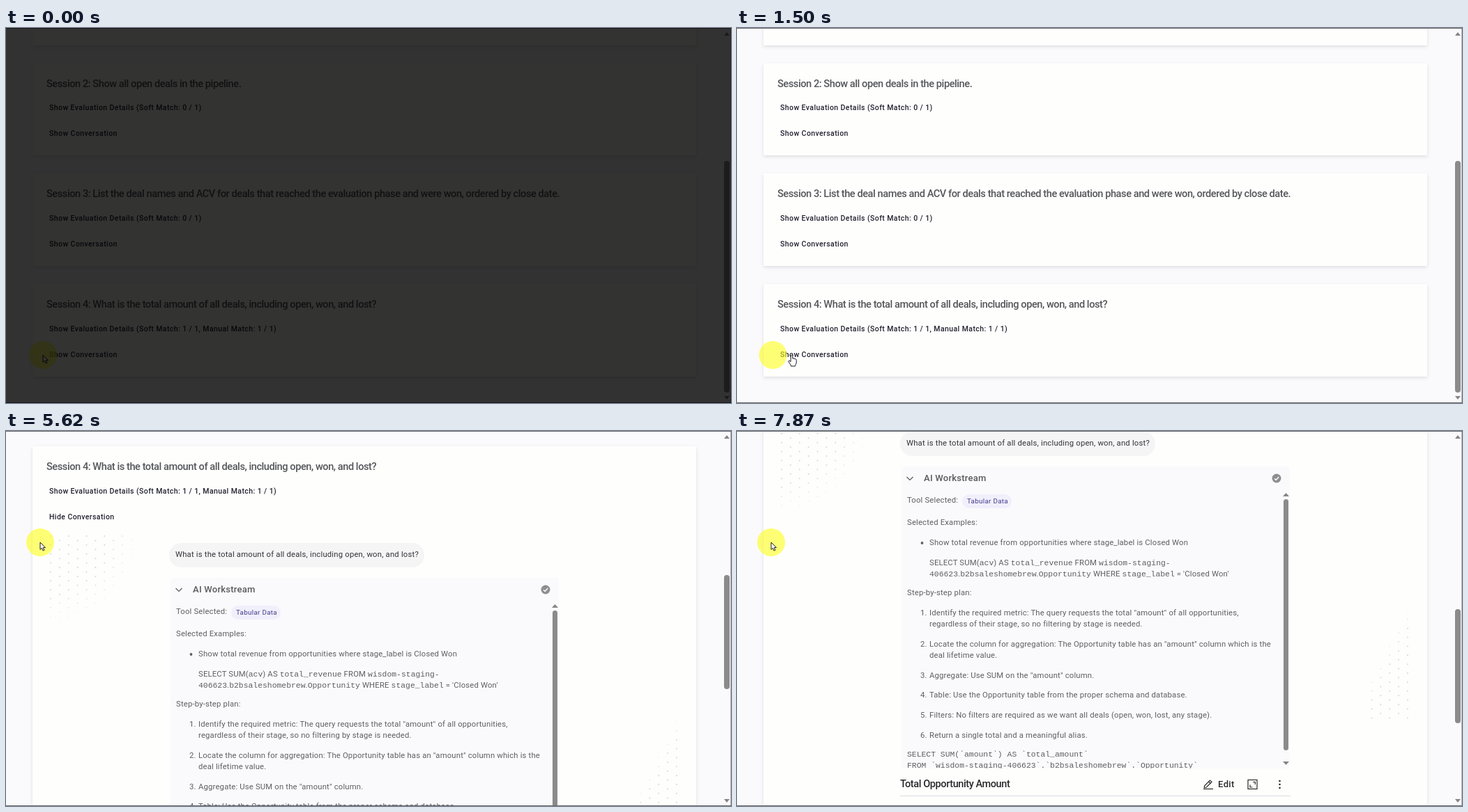
An HTML page with a canvas for the animation above (8000 ms loop, 1040x539 px).

```html
<!DOCTYPE html>
<html lang="en">
<head>
<meta charset="utf-8">
<title>Session review</title>
<style>
  html, body { margin: 0; width: 100%; height: 100%; overflow: hidden; background: #fafafc; }
  #stage { position: relative; width: 1040px; height: 539px; overflow: hidden; background: #fafafc;
    font-family: Roboto, "Liberation Sans", sans-serif; }
  #stage div, #stage canvas, #stage svg { position: absolute; }
  .text { white-space: pre; line-height: 20px; font-size: 11.3px; letter-spacing: .17px; color: #5f5f62; }
  .title { font-size: 14.6px; font-weight: 500; letter-spacing: -.45px; color: #56575b; }
  .label { font-size: 10.5px; font-weight: 500; letter-spacing: .41px; color: #222230; }
  .ask { color: #333338; letter-spacing: .19px; }
  .head { font-size: 13px; font-weight: 500; letter-spacing: .24px; color: #5a5a5e; }
  .pill { font-size: 9.8px; letter-spacing: .3px; color: #453a8c; }
  .code, code { font-family: "Liberation Mono", "DejaVu Sans Mono", monospace; font-size: 11.4px; letter-spacing: 0; }
  .result { font-size: 14.5px; font-weight: 500; letter-spacing: -.4px; color: #29292d; }
  .edit { font-size: 13px; font-weight: 500; letter-spacing: .4px; color: #29292d; }
  .card { background: #fefefd; box-shadow: 0 2px 5px rgba(0,0,0,.11); }
  .thumb { background: #8b8b8b; border-radius: 4px; }
  .up { clip-path: polygon(50% 0, 100% 100%, 0 100%); background: #858585; }
  .down { clip-path: polygon(0 0, 100% 0, 50% 100%); background: #858585; }
  .edge { background: #6c6c6e; }
  #spot { width: 40px; height: 40px; margin: -20px; border-radius: 50%; background: rgba(255,255,20,.58); }
  #ring { width: 36px; height: 36px; margin: -20px; border-radius: 50%; border: 2px solid #dcb42e;
    background: rgba(240,190,40,.12); }
  #shade { inset: 0; background: #000; }
</style>
</head>
<body>
<div id="stage"></div>
<script>
const stage = document.getElementById('stage');

function box(parent, x, y, w, h, cls = '', css = '') {
  const el = document.createElement('div');
  el.className = cls;
  el.style.cssText = `left:${x}px;top:${y}px;${w ? `width:${w}px;` : ''}${h ? `height:${h}px;` : ''}${css}`;
  parent.append(el);
  return el;
}

// y is the middle of the line
function text(parent, x, y, html, cls = '') {
  const el = box(parent, x, y - 10, 0, 0, 'text ' + cls);
  el.innerHTML = html;
  return el;
}

const page = box(stage, 0, 0, 1040, 1400);
box(page, 38, -120, 951.5, 144.5, 'card');

const question = 'What is the total amount of all deals, including open, won, and lost?';
const sessions = [
  ['Session 2: Show all open deals in the pipeline.', 'Soft Match: 0 / 1'],
  ['Session 3: List the deal names and ACV for deals that reached the evaluation phase and were won, ordered by close date.', 'Soft Match: 0 / 1'],
  ['Session 4: ' + question, 'Soft Match: 1 / 1, Manual Match: 1 / 1']
];
let card, hover, toggle;
sessions.forEach(([title, match], i) => {
  const top = 50.5 + i * 158.75;
  card = box(page, 38, top, 951.5, 132.5, 'card');
  hover = box(page, 58, top + 90, 106, 23, '', 'background:#f4f4f5;border-radius:2px;opacity:0');
  text(page, 58, Math.round(top + 29), title, 'title');
  text(page, 62, Math.round(top + 64.6), `Show Evaluation Details (${match})`, 'label');
  toggle = text(page, 62, Math.round(top + 101.8), 'Show Conversation', 'label');
});

// Conversation that opens inside the last card
const talk = box(page, 0, 346, 1040, 1000);
const art = document.createElement('canvas');
art.width = 1040;
art.height = 700;
art.style.cssText = 'left:0;top:0';
box(talk, 234, 161, 366, 35, '', 'background:#f5f5f6;border-radius:17px');
text(talk, 243, 178, question, 'ask');
box(talk, 236, 211, 557, 436, '', 'background:#fafafc;border-radius:4px');
text(talk, 268, 228, 'AI Workstream', 'head');
text(talk, 244, 260, 'Tool Selected:');
box(talk, 323, 251, 71, 20, '', 'background:#f0effb;border-radius:10px');
text(talk, 330, 261, 'Tabular Data', 'pill');
text(talk, 244, 292, 'Selected Examples:');
text(talk, 276, 321, 'Show total revenue from opportunities where stage_label is Closed Won');
text(talk, 276, 350, 'SELECT SUM(<code>acv</code>) AS <code>total_revenue</code> FROM <code>wisdom-staging-</code>');
text(talk, 276, 366, "<code>406623</code>.<code>b2bsaleshomebrew</code>.<code>Opportunity</code> WHERE <code>stage_label</code> = 'Closed Won'");
text(talk, 244, 393, 'Step-by-step plan:');

const steps = [
  ['Identify the required metric: The query requests the total "amount" of all opportunities,',
    'regardless of their stage, so no filtering by stage is needed.'],
  ['Locate the column for aggregation: The Opportunity table has an "amount" column which is the',
    'deal lifetime value.'],
  ['Aggregate: Use SUM on the "amount" column.'],
  ['Table: Use the Opportunity table from the proper schema and database.'],
  ['Filters: No filters are required as we want all deals (open, won, lost, any stage).'],
  ['Return a single total and a meaningful alias.']
];
let line = 421.5;
steps.forEach((rows, i) => {
  text(talk, 263, Math.round(line), `${i + 1}.`);
  rows.forEach((row, j) => text(talk, 276, Math.round(line + 16 * j), row));
  line += 12.8 + 16.1 * rows.length;
});
text(talk, 244, 625, 'SELECT SUM(`amount`) AS `total_amount`', 'code');
text(talk, 244, 641, 'FROM `wisdom-staging-406623`.`b2bsaleshomebrew`.`Opportunity`', 'code');
box(talk, 784, 258, 7, 361, 'thumb');
box(talk, 783, 249, 9, 5, 'up');
box(talk, 783, 635, 9, 5, 'down');
box(talk, 200, 645, 640, 60, '', 'background:#fefefd');
text(talk, 234, 668, 'Total Opportunity Amount', 'result');
text(talk, 690, 668, 'Edit', 'edit');
box(talk, 234, 684, 560, 1, '', 'background:#dcdcde');
talk.append(art);

function drawArt(c) {
  const dot = (x, y, r, color) => {
    c.fillStyle = color;
    c.beginPath();
    c.arc(x, y, r, 0, 7);
    c.fill();
  };
  const path = (color, width, ...pts) => {
    c.strokeStyle = color;
    c.lineWidth = width;
    c.beginPath();
    for (let i = 0; i < pts.length; i += 2) c.lineTo(pts[i], pts[i + 1]);
    c.stroke();
  };
  const gap = 12.87;
  const grey = a => `rgba(110,110,120,${Math.max(0, Math.min(.28, a))})`;
  for (let i = 0; i < 10; i++) {
    for (let j = 0; j < 10; j++) {
      const dx = i * gap, dy = (j + i % 2 / 2) * gap;
      dot(64 + dx, 151 + dy, 1, grey((128 - Math.hypot(dx, dy)) / 160));
    }
  }
  for (let i = 0; i < 5; i++) {
    for (let j = 0; j < 13; j++) {
      const y = 418 + (j + i % 2 / 2) * gap;
      const inside = y - 410 - i * gap * 1.9;
      if (y < 575) dot(962 - i * gap, y, 1, grey(inside / 130));
    }
  }
  path('#5a5a5e', 1.2, 243.5, 226, 248, 230.5, 252.5, 226);
  dot(774, 228, 6.5, '#8e8e91');
  path('#fff', 1.4, 771, 228.2, 773.2, 230.4, 777.2, 226);
  dot(265.5, 321, 1.9, '#5f5f62');
  const ink = '#29292d';
  path(ink, 1.2, 670, 673, 671, 669.5, 678.5, 662, 681, 664.5, 673.5, 672, 670, 673);
  path(ink, 1.1, 676.5, 664, 679, 666.5);
  path(ink, 1.2, 669, 674.5, 683, 674.5);
  c.strokeRect(733, 661.5, 13, 13);
  path(ink, 1.2, 740, 664.5, 743.3, 664.5, 743.3, 668);
  path(ink, 1.2, 736, 668.5, 736, 672, 739.5, 672);
  for (const y of [663, 668, 673]) dot(778.5, y, 1.3, ink);
}
drawArt(art.getContext('2d'));

// Window edges and scrollbar
box(stage, 0, 0, 1040, 1, 'edge');
box(stage, 0, 538, 1040, 1, 'edge');
box(stage, 1039, 0, 1, 539, 'edge', 'opacity:.5');
box(stage, 1030, 6, 8, 5, 'up');
box(stage, 1030, 529, 8, 5, 'down');
const thumb = box(stage, 1030, 191, 7.5, 333, 'thumb');

// Pointer, with its tip at 0,0
const spot = box(stage, 0, 0);
spot.id = 'spot';
const ring = box(stage, 0, 0);
ring.id = 'ring';
const pointer = box(stage, 0, 0);
pointer.innerHTML = `
<svg width="30" height="30" style="left:-10px;top:-5px" viewBox="-10 -5 30 30" fill="#fff" stroke="#1c1c22" stroke-linejoin="round">
  <path id="arrow" d="M0 0V10.4L2.4 8.2L4.1 12L5.9 11.2L4.3 7.6H7.4Z"/>
  <path id="hand" d="M-1.4 9.5V.8Q0-.9 1.3.8V5Q2.6 4.3 3.5 5.4Q4.8 4.8 5.6 6Q6.7 5.8 6.7 7.4V11Q6.5 13 5 14.5V16H-1.2V14.6L-4.6 9.6Q-4.8 8 -3.4 8.2Z"/>
</svg>`;
const arrow = pointer.querySelector('#arrow');
const hand = pointer.querySelector('#hand');
const shade = box(stage, 0, 0);
shade.id = 'shade';

function track(t, keys) {
  let [t0, v0] = keys[0];
  if (t <= t0) return v0;
  for (const [t1, v1] of keys) {
    if (t < t1) return v0 + (v1 - v0) * (t - t0) / (t1 - t0);
    [t0, v0] = [t1, v1];
  }
  return v0;
}

const mouseX = [[1000, 53], [1375, 51.5], [1500, 78.5], [1625, 86], [3875, 86], [4250, 49]];
const mouseY = [[3875, 470], [4250, 160]];
const scrolling = [[4000, 0], [4375, 346], [6250, 346], [6625, 393], [7875, 506]];
const place = (el, x, y) => { el.style.transform = `translate(${x}px,${y}px)`; };
const show = (el, on) => { el.style.display = on ? '' : 'none'; };

function render(t) {
  const open = t >= 4000;
  const scroll = Math.round(track(t, scrolling));
  place(page, 0, -scroll);
  show(talk, open);
  card.style.height = (open ? 981 : 132.5) + 'px';
  toggle.textContent = (open ? 'Hide' : 'Show') + ' Conversation';
  hover.style.opacity = open ? 0 : track(t, [[1750, 0], [2000, 1]]);

  const total = open ? 1673 : 824;
  thumb.style.top = 15 + (285 + scroll) * 509 / total + 'px';
  thumb.style.height = 539 * 509 / total + 'px';

  // the highlight trails the pointer by one tick
  const sx = track(t - 125, mouseX), sy = track(t - 125, mouseY);
  place(spot, sx, sy);
  place(ring, sx, sy);
  show(ring, t >= 3625 && !open);
  ring.style.opacity = track(t, [[3500, 0], [3750, 1]]);
  place(pointer, track(t, mouseX), track(t, mouseY));
  const link = t >= 1500 && t < 4125;
  show(hand, link);
  show(arrow, !link);
  shade.style.opacity = track(t, [[0, .8], [375, .19], [500, 0]]);
}

const start = performance.now();
function loop() {
  const t = (performance.now() - start) % 8000;
  render(Math.floor((t + 5) / 125) % 64 * 125);
  requestAnimationFrame(loop);
}
render(0);
loop();
</script>
</body>
</html>
```
